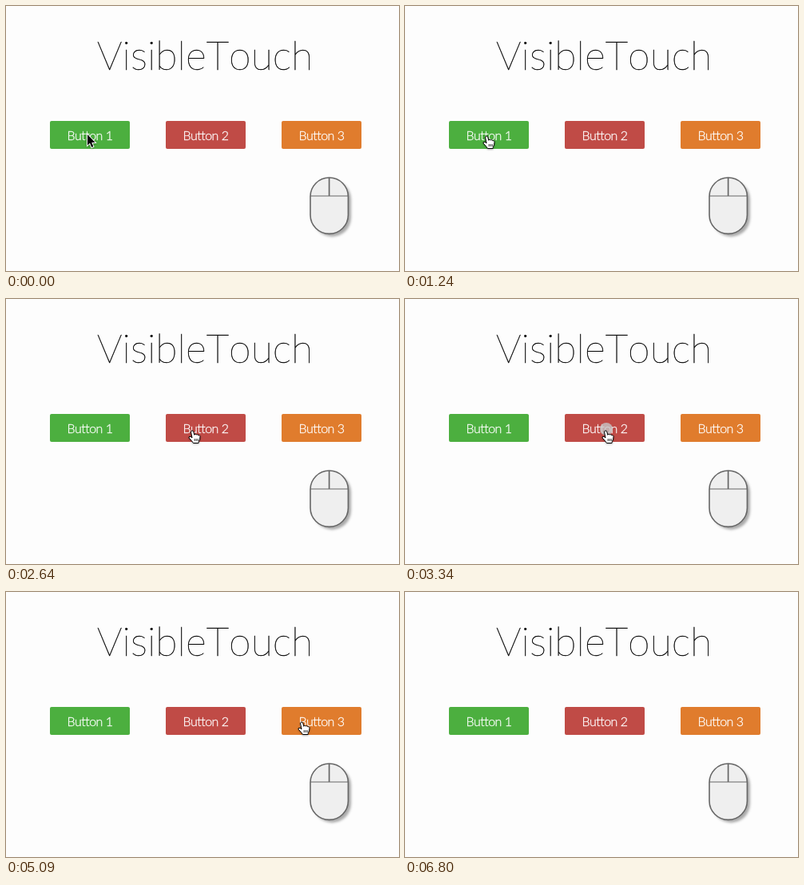
Recreate the animation shown at these times as an HTML page. Size 492 by 332 pixels, loop 8.27 s.

```html
<!DOCTYPE html>
<html lang="en">
<head>
<meta charset="utf-8">
<title>VisibleTouch</title>
<style>
  html, body { margin: 0; width: 100%; height: 100%; overflow: hidden; background: #fdfdfd; }
  svg { display: block; }
  text { font-family: Lato, sans-serif; text-anchor: middle; }
  .title { font-size: 50px; font-weight: 100; font-kerning: none; fill: #000; stroke: #000; stroke-width: .4; }
  .button text { font-size: 16px; font-weight: 300; letter-spacing: -.5px; fill: #fff; stroke: #fff; stroke-width: .3; }
  .button.pressed rect { filter: brightness(.85); }
  .line { fill: none; stroke: #666; }
  .hidden { display: none; }
</style>
</head>
<body>
<svg width="492" height="332" viewBox="0 0 492 332">
  <defs>
    <filter id="soft" x="-20%" y="-20%" width="150%" height="150%">
      <feDropShadow dx="3.5" dy="3.5" stdDeviation="1.6" flood-color="#000" flood-opacity=".33"/>
    </filter>
    <filter id="faint" x="-30%" y="-30%" width="180%" height="180%">
      <feDropShadow dx="0" dy="1" stdDeviation=".8" flood-color="#000" flood-opacity=".3"/>
    </filter>
  </defs>

  <text class="title" x="249" y="80">VisibleTouch</text>

  <g class="button"><rect x="55" y="144" width="100" height="35" rx="2" fill="#4caf3f"/><text x="105" y="168">Button 1</text></g>
  <g class="button"><rect x="200" y="144" width="100" height="35" rx="2" fill="#c04b46"/><text x="250" y="168">Button 2</text></g>
  <g class="button"><rect x="345" y="144" width="100" height="35" rx="2" fill="#e07c2d"/><text x="395" y="168">Button 3</text></g>

  <g id="mouse">
    <rect x="381" y="215" width="47.4" height="70.4" rx="23.7" fill="#efefef" filter="url(#soft)"/>
    <path id="leftKey" class="hidden" d="M381 238A23.7 23.7 0 0 1 404 215V238Z" fill="#999"/>
    <path class="line" d="M381 238H428" stroke-width="1"/>
    <path class="line" d="M404.6 215V238" stroke="#888" stroke-width="1.7"/>
    <rect class="line" x="381" y="215" width="47.4" height="70.4" rx="23.7" stroke-width="1.6"/>
  </g>

  <circle id="ripple" fill="#c6c6c6"/>

  <g id="cursor">
    <path id="arrow" transform="translate(5 -1)" filter="url(#faint)" fill="#000" stroke="#fff" stroke-width="1.8"
      paint-order="stroke" d="M0 0V13.5L3 10.7 5.3 16 7.4 15.1 5.2 10H9.6Z"/>
    <g id="hand" filter="url(#faint)" stroke="#000" stroke-linejoin="round">
      <path fill="#fff" d="M5 10L3.6 3A1.6 1.6 0 0 1 6.7 2.2L7.8 6.3A1.5 1.5 0 0 1 10.4 6 1.5 1.5 0 0 1 12.8 7 1.4 1.4 0 0 1 15 8.3L14.6 12Q13 14.5 13 16.5H6.5Q5 14 1.2 10.2 .4 8.6 2 8.3 3.4 8.2 5 10Z"/>
      <path fill="none" stroke-width=".8" d="M8.2 11V14M10.2 11V14M12.2 11V14"/>
    </g>
  </g>
</svg>
<script>
const LOOP = 8270, STEP = 57, CURSOR_GONE = 6800;
const byId = id => document.getElementById(id);
const buttons = [...document.querySelectorAll('.button')];

// Each move: waypoints of [ms, x, y], sampled on a coarse frame grid.
const moves = [
  [[1840, 101, 162], [1955, 126, 162], [2070, 153, 162], [2300, 190, 156.5],
   [2500, 218, 161], [2640, 228, 164], [2700, 233, 164], [2810, 246, 164]],
  [[4050, 250, 164], [4280, 275, 160], [4450, 302, 157], [4650, 330, 157],
   [4860, 350, 161], [5090, 366, 162], [5300, 380, 161], [5500, 390, 159]]
];
const clicks = [
  { down: 770, up: 1010, from: 9, to: 32 },
  { down: 3160, up: 3340, from: 8, to: 31 },
  { down: 5800, up: 5970, from: 16, to: 40 }
];

function positionAt(time) {
  const move = moves.filter(m => time >= m[0][0]).pop();
  if (!move) return [97, 162];
  const start = move[0][0];
  const t = start + Math.floor((time - start) / STEP + .01) * STEP;
  const next = move.findIndex(p => p[0] > t);
  if (next < 0) return move[move.length - 1].slice(1);
  const [t0, x0, y0] = move[next - 1], [t1, x1, y1] = move[next];
  const k = (t - t0) / (t1 - t0);
  return [x0 + (x1 - x0) * k, y0 + (y1 - y0) * k];
}

const show = (el, on) => el.classList.toggle('hidden', !on);

function render(time) {
  const [x, y] = positionAt(time);
  const overButton = [55, 200, 345].some(left => x + 5 >= left && x + 5 < left + 100);
  const isHand = overButton && time >= clicks[0].down;
  byId('cursor').setAttribute('transform', `translate(${Math.round(x)} ${Math.round(y)})`);
  show(byId('cursor'), time < CURSOR_GONE);
  show(byId('hand'), isHand);
  show(byId('arrow'), !isHand);

  const pressed = clicks.findIndex(c => time >= c.down && time < c.up);
  buttons.forEach((b, i) => b.classList.toggle('pressed', i === pressed));
  show(byId('leftKey'), pressed >= 0);

  const ripple = byId('ripple');
  const click = clicks.find(c => time >= c.up && time < c.up + 230);
  show(ripple, click);
  if (click) {
    const k = Math.min(3, Math.floor((time - click.up) / 57.5)) / 3;
    ripple.setAttribute('cx', x + 6);
    ripple.setAttribute('cy', y - 1);
    ripple.setAttribute('r', click.from + (click.to - click.from) * k);
    ripple.setAttribute('opacity', .8 - .6 * k);
  }
}

const begin = performance.now();
function tick() {
  render((performance.now() - begin) % LOOP);
  requestAnimationFrame(tick);
}
tick();
</script>
</body>
</html>
```
